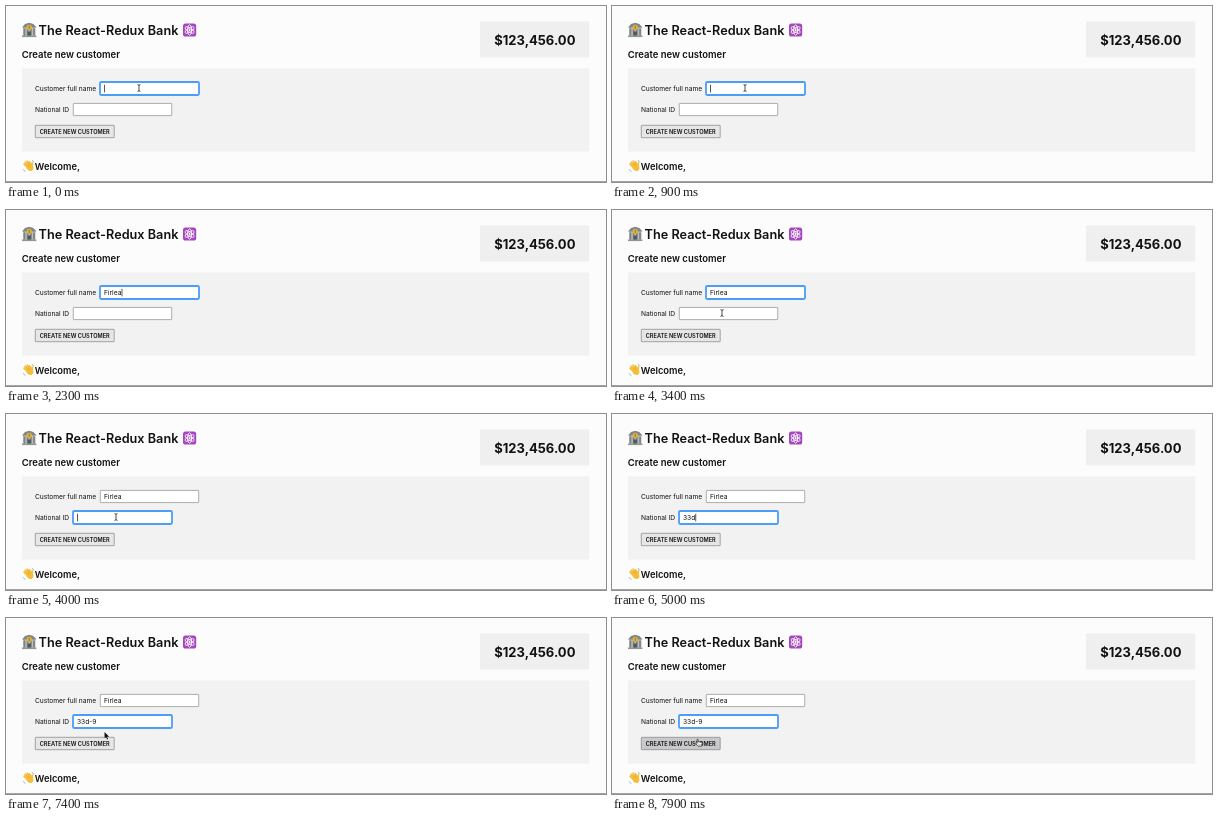
Recreate the animation shown at these times as an HTML page with a canvas. Size 600 by 176 pixels, loop 8 s.

```html
<!DOCTYPE html>
<html lang="en">
<head>
<meta charset="utf-8">
<title>The React-Redux Bank</title>
<style>
  html, body { margin: 0; width: 100%; height: 100%; overflow: hidden; background: #fcfcfc; }
  canvas { display: block; width: 600px; height: 176px; }
</style>
</head>
<body>
<canvas id="stage"></canvas>
<script>
const W = 600, H = 176, LOOP = 8000, STEP = 100;
const canvas = document.getElementById('stage');
const ctx = canvas.getContext('2d');
const dpr = window.devicePixelRatio || 1;
canvas.width = W * dpr;
canvas.height = H * dpr;

const nameField = { x: 94, y: 76, w: 99, h: 13 };
const idField = { x: 67, y: 97, w: 99, h: 13 };
const button = { x: 29, y: 119, w: 79.5, h: 13 };

// Times at which each character is typed.
const nameText = 'Firlea', nameKeys = [1000, 1100, 1800, 1900, 2100, 2300];
const idText = '33d-9', idKeys = [4200, 4400, 5000, 5800, 6300];
const FOCUS_ID = 3600;
const caretOn = [[0, 200], [900, 1500], [1800, 2700], [3600, 4600], [5000, 5500], [5800, 6400]];

// Mouse legs: visible from start to end, moving between the two points.
const mouse = [
  { start: 0, end: 1000, t0: 0, t1: 1, from: [133, 82], to: [133, 82] },
  { start: 2900, end: 4200, t0: 2900, t1: 3400, from: [133, 82], to: [110, 103] },
  { start: 7000, end: 8000, t0: 7000, t1: 7800, from: [110, 103], to: [87, 125] }
];

const ease = p => p * p * (3 - 2 * p);
const clamp = p => Math.min(1, Math.max(0, p));
const typed = (text, keys, t) => text.slice(0, keys.filter(k => k <= t).length);
const inside = (r, [x, y]) => x >= r.x && x <= r.x + r.w && y >= r.y && y <= r.y + r.h;

function rect(x, y, w, h, fill) {
  ctx.fillStyle = fill;
  ctx.fillRect(x, y, w, h);
}

function disc(x, y, r, fill) {
  ctx.fillStyle = fill;
  ctx.beginPath();
  ctx.arc(x, y, r, 0, Math.PI * 2);
  ctx.fill();
}

function poly(points, fill) {
  ctx.fillStyle = fill;
  ctx.beginPath();
  points.forEach(([x, y]) => ctx.lineTo(x, y));
  ctx.closePath();
  ctx.fill();
}

function line(points, color, width) {
  ctx.strokeStyle = color;
  ctx.lineWidth = width;
  ctx.beginPath();
  points.forEach(([x, y]) => ctx.lineTo(x, y));
  ctx.stroke();
}

function roundBox(x, y, w, h, r, fill, stroke, width = 1) {
  ctx.beginPath();
  ctx.roundRect(x, y, w, h, r);
  ctx.fillStyle = fill;
  ctx.fill();
  if (!stroke) return;
  ctx.strokeStyle = stroke;
  ctx.lineWidth = width;
  ctx.stroke();
}

function label(text, x, y, size, weight = 400, align = 'left') {
  ctx.font = `${weight} ${size}px Inter, sans-serif`;
  ctx.textAlign = align;
  ctx.fillStyle = '#111';
  ctx.fillText(text, x, y);
}

function bankIcon() {
  rect(17, 20, 12.5, 10, '#c3bda9');
  poly([[16, 21.5], [19, 18], [23.2, 16.8], [27.4, 18], [30.4, 21.5]], '#7c868b');
  for (let i = 0; i < 4; i++) rect(17.6 + i * 3.2, 22.5, 1.7, 7, '#77818a');
  rect(21.6, 25.5, 3.2, 4.5, '#4c5961');
  rect(16, 29.5, 14.4, 1.6, '#8f9598');
  disc(23.2, 21.3, 2.6, '#e3b53c');
  rect(22.8, 19.7, 0.8, 3.2, '#80611c');
}

function atomIcon() {
  roundBox(177, 17.4, 13.2, 13.2, 2.6, '#a546bd');
  ctx.strokeStyle = '#fff';
  ctx.lineWidth = 0.85;
  for (let i = 0; i < 3; i++) {
    ctx.beginPath();
    ctx.ellipse(183.6, 24, 5.2, 2, Math.PI / 2 + i * Math.PI / 3, 0, Math.PI * 2);
    ctx.stroke();
  }
  disc(183.6, 24, 1.1, '#fff');
}

function waveIcon() {
  const skin = '#f6bd37';
  ctx.lineCap = 'round';
  [[18.2, 158.2], [19.2, 156.4], [21.2, 155.3], [23.7, 156.1]].forEach(([x, y], i) =>
    line([[x, y], [22.4 + i, 162 - i * 0.7]], skin, 1.9));
  line([[26.3, 157.3], [26, 161]], skin, 1.9);
  ctx.fillStyle = skin;
  ctx.beginPath();
  ctx.ellipse(23.9, 161.6, 3.6, 3.1, 0.7, 0, Math.PI * 2);
  ctx.fill();
  line([[20.6, 157.4], [23, 160]], '#d8922a', 0.4);
  line([[22.4, 156.8], [24.3, 159.3]], '#d8922a', 0.4);
  ctx.strokeStyle = '#6f9fb8';
  ctx.lineWidth = 0.7;
  [[24.5, 157.5, -1.1, -0.4], [20.5, 162, 2, 2.7]].forEach(([x, y, a, b]) => {
    ctx.beginPath();
    ctx.arc(x, y, 3.6, a, b);
    ctx.stroke();
  });
  ctx.lineCap = 'butt';
}

function field(r, text, focused, caret) {
  if (focused) roundBox(r.x, r.y, r.w, r.h, 1.2, '#fff', '#4c9df6', 1.8);
  else roundBox(r.x + 0.3, r.y + 0.4, r.w - 0.6, r.h - 0.8, 0.4, '#fff', '#8e8e8e', 0.7);
  const x = r.x + 3.9, base = r.y + 9;
  label(text, x, base, 6.7);
  if (caret) rect(x + ctx.measureText(text).width + 0.2, r.y + 2.8, 0.7, 7.6, '#111');
}

function beam(x, y) {
  for (const [color, width] of [['#fff', 1.8], ['#222', 0.8]]) {
    line([[x, y - 3], [x, y + 3]], color, width);
    for (const s of [-1, 1]) line([[x - 1.5, y + 3.4 * s], [x, y + 2.8 * s], [x + 1.5, y + 3.4 * s]], color, width);
  }
}

function arrow(x, y) {
  ctx.save();
  ctx.translate(x, y);
  const shape = [[0, 0], [0, 6.6], [1.6, 5.2], [2.6, 7.4], [3.6, 7], [2.6, 4.8], [4.7, 4.7]];
  line([...shape, shape[0]], '#fff', 1);
  poly(shape, '#111');
  ctx.restore();
}

function hand(x, y) {
  ctx.save();
  ctx.translate(x, y);
  const shape = [[-2, -3.6], [-1, -3.6], [-0.7, -1.2], [2.4, -0.7], [3.2, 0.2],
    [2.6, 3.2], [-1, 3.2], [-3.6, 0.2], [-3, -0.5], [-1.8, 0.5]];
  poly(shape, '#fff');
  line([...shape, shape[0]], '#222', 0.7);
  for (const dx of [-0.2, 0.9, 2]) line([[dx, 0.8], [dx, 2.2]], '#444', 0.35);
  ctx.restore();
}

function mouseAt(t) {
  const leg = mouse.find(m => t >= m.start && t < m.end);
  if (!leg) return null;
  const p = ease(clamp((t - leg.t0) / (leg.t1 - leg.t0)));
  return leg.from.map((v, i) => v + (leg.to[i] - v) * p);
}

function draw(t) {
  const pos = mouseAt(t);
  const hover = pos && inside(button, pos);
  const onId = t >= FOCUS_ID;
  const caret = caretOn.some(([a, b]) => t >= a && t < b);

  ctx.setTransform(dpr, 0, 0, dpr, 0, 0);
  rect(0, 0, W, H, '#fcfcfc');
  rect(474, 15.5, 109.3, 36, '#efefef');
  rect(16, 62.5, 567.3, 83, '#f2f2f2');
  rect(0, 175, W, 1, '#a5a5a5');

  bankIcon();
  label('The React-Redux Bank', 32.6, 28.6, 12.7, 600);
  atomIcon();
  label('$123,456.00', 528.8, 38.7, 13, 700, 'center');
  label('Create new customer', 15.7, 51.6, 9.5, 600);
  label('Customer full name', 28.9, 85, 6.65);
  label('National ID', 28.9, 106.1, 6.65);
  waveIcon();
  label('Welcome,', 28.8, 163.6, 9.4, 600);

  field(nameField, typed(nameText, nameKeys, t), !onId, caret && !onId);
  field(idField, typed(idText, idKeys, t), onId, caret && onId);
  roundBox(button.x + 0.3, button.y + 0.3, button.w - 0.6, button.h - 0.6, 0.4,
    hover ? '#c9c9cb' : '#e6e6e6', '#858585', 0.7);
  label('CREATE NEW CUSTOMER', button.x + button.w / 2, 127.5, 5.62, 600, 'center');

  if (!pos) return;
  const cursor = hover ? hand : inside(nameField, pos) || inside(idField, pos) ? beam : arrow;
  cursor(...pos);
}

function tick() {
  const t = performance.now() % LOOP;
  draw(Math.floor(t / STEP) * STEP);
  requestAnimationFrame(tick);
}
tick();
</script>
</body>
</html>
```
